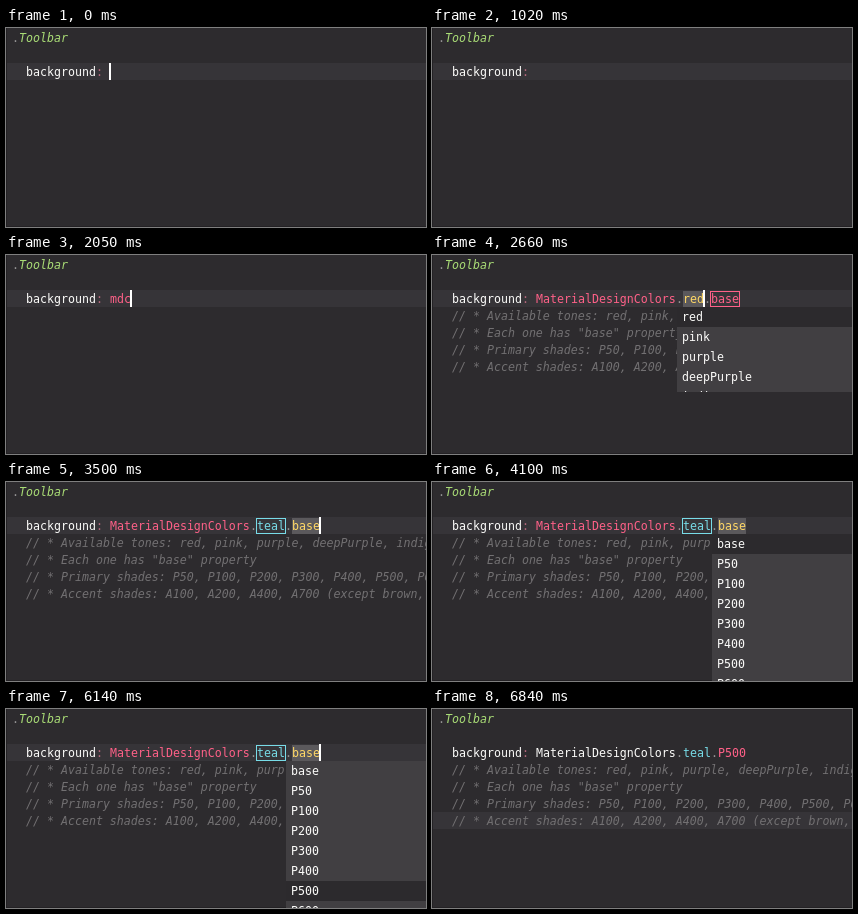
An HTML page with a canvas for the animation above (9460 ms loop, 420 px wide and 199 px high).

```html
<!DOCTYPE html>
<html lang="en">
<head>
<meta charset="utf-8">
<title>Color template completion</title>
<style>
html, body { margin: 0; width: 100%; height: 100%; overflow: hidden; background: #2d2b2e; }
canvas { display: block; width: 420px; height: 199px; }
</style>
</head>
<body>
<canvas id="stage"></canvas>
<script>
const W = 420, H = 199, LOOP = 9460;
const CELL = 7, LINE = 17, ROW = 20, LEFT = 20, CODE_Y = 35;
const FONT = '11.627px "DejaVu Sans Mono", "Noto Sans Mono", monospace';
const C = {
  bg: '#2d2b2e', line: '#363438', edge: '#232124', popup: '#413f42', picked: '#2c2a2d',
  text: '#fcfcfa', dim: '#939293', comment: '#727072', colon: '#b0667a',
  red: '#ff6188', green: '#a9dc76', yellow: '#ffd866', cyan: '#78dce8',
  select: '#5b595c', icon: '#b1823a', iconText: '#403016'
};

const PROPS = ['marquee-direction', 'mso-diagonal-down-color', 'mso-diagonal-down',
  'mso-data-placement', 'mso-default-height', 'mso-default-width',
  'mso-diagonal-down-source', 'mso-diagonal-down-style'];
const TONES = ['red', 'pink', 'purple', 'deepPurple', 'indigo', 'blue', 'lightBlue', 'cyan'];
const SHADES = ['base', 'P50', 'P100', 'P200', 'P300', 'P400', 'P500', 'P600'];
const COMMENTS = [
  '// * Available tones: red, pink, purple, deepPurple, indigo, blue, lightBlue',
  '// * Each one has "base" property',
  '// * Primary shades: P50, P100, P200, P300, P400, P500, P600, P700',
  '// * Accent shades: A100, A200, A400, A700 (except brown, grey)'
];

const canvas = document.getElementById('stage');
const dpr = window.devicePixelRatio || 1;
canvas.width = Math.round(W * dpr);
canvas.height = Math.round(H * dpr);
const ctx = canvas.getContext('2d');
ctx.scale(dpr, dpr);

// Number of moments already reached.
const passed = (t, times) => times.filter(m => t >= m).length;

function rect(x, y, w, h, color) {
  ctx.fillStyle = color;
  ctx.fillRect(x, y, w, h);
}

function write(s, x, y, color, style = '') {
  ctx.font = style + FONT;
  ctx.fillStyle = color;
  ctx.fillText(s, x, y);
  return x + s.length * CELL;
}

// Draws [text, color, look] runs; returns the x after the last one.
function writeRuns(runs, x, y) {
  for (const [s, color, look] of runs) {
    const w = s.length * CELL;
    if (look === 'selected') rect(x, y - 12, w, LINE - 1, C.select);
    if (look === 'boxed') {
      ctx.strokeStyle = color;
      ctx.lineWidth = 1;
      ctx.strokeRect(x - 0.5, y - 11.5, w + 1, LINE - 2);
    }
    x = write(s, x, y, color);
  }
  return x;
}

function caret(col) {
  rect(LEFT + col * CELL - 1, CODE_Y, 2, LINE, '#fff');
}

// Label with typed letters marked at word starts or right after another match.
function label(s, typed, x, y) {
  let n = 0, joined = true;
  for (let i = 0; i < s.length; i++) {
    const hit = n < typed.length && s[i] === typed[n] && (joined || s[i - 1] === '-');
    if (hit) n++;
    joined = hit;
    x = write(s[i], x, y, hit ? C.yellow : C.text);
  }
}

function icon(y) {
  ctx.fillStyle = C.icon;
  ctx.beginPath();
  ctx.roundRect(84, y + 3, 14, 14, 2.5);
  ctx.fill();
  ctx.font = '9px "DejaVu Sans", sans-serif';
  ctx.fillStyle = C.iconText;
  ctx.fillText('P', 88.4, y + 13.3);
}

function popup(x, items, { picked = 0, typed = '', icons = false, bottom = H } = {}) {
  const top = CODE_Y + LINE;
  const h = Math.min(bottom, top + items.length * ROW) - top;
  ctx.save();
  ctx.beginPath();
  ctx.rect(x, top, W - x, h);
  ctx.clip();
  rect(x, top, W - x, h, C.popup);
  items.forEach((item, i) => {
    const y = top + i * ROW;
    if (i === picked) rect(x, y, W - x, ROW, C.picked);
    if (icons) icon(y);
    label(item, typed, icons ? 103 : x + 5, y + 14);
  });
  ctx.restore();
}

function codeLine(runs) {
  return writeRuns([['background', C.text], [':', C.colon], [' ', C.text], ...runs], LEFT, CODE_Y + 13);
}

function typing(t) {
  const typed = 'mdc'.slice(0, passed(t, [1270, 1470, 1540]));
  codeLine([[typed, C.red]]);
  if (t >= 1400 && t < 2050) {
    if (t < 1610) popup(77, PROPS, { typed: typed.slice(0, 2), icons: true });
    else popup(77, ['mdc', PROPS[1]], { typed, icons: true });
  }
  if (t < 1020 || t >= 1270) caret(12 + typed.length);
}

function template(t) {
  COMMENTS.forEach((s, i) => write(s, LEFT, CODE_Y + 13 + (i + 1) * LINE, C.comment, 'italic '));
  const owner = [['MaterialDesignColors', t < 6840 ? C.red : C.text], ['.', C.dim]];
  const dot = ['.', C.dim];

  if (t < 3500) {
    const typed = 'te'.slice(0, passed(t, [2790, 2860]));
    const tone = typed ? [typed, C.cyan, 'boxed'] : ['red', C.yellow, 'selected'];
    codeLine([...owner, tone, dot, ['base', C.red, 'boxed']]);
    if (typed) popup(245, ['teal'], { typed });
    else if (t >= 2660) popup(245, TONES, { bottom: t < 2720 ? 137 : H });
    caret(33 + tone[0].length);
  } else if (t < 6510) {
    codeLine([...owner, ['teal', C.cyan, 'boxed'], dot, ['base', C.yellow, 'selected']]);
    if (t >= 3570) popup(280, SHADES, { picked: passed(t, [5340, 5500, 5640, 5830, 6000, 6140]) });
    if (passed(t, [4100, 4620, 5140, 5660, 6210]) % 2 === 0) caret(42);
  } else {
    const open = t < 6580;
    codeLine([...owner, ['teal', C.cyan, open ? 'boxed' : ''], dot, ['P500', C.red]]);
    if (open) caret(42);
  }
}

function draw(t) {
  rect(0, 0, W, H, C.bg);
  rect(0, t < 6580 ? CODE_Y : CODE_Y + 4 * LINE, W, LINE, C.line);
  rect(0, 0, 1, H, C.edge);
  rect(0, H - 1, W, 1, C.edge);
  writeRuns([['.', C.dim]], 6, 14);
  write('Toolbar', 13, 14, C.green, 'italic ');
  if (t < 2120) typing(t);
  else template(t);
}

const start = performance.now();
function tick() {
  draw((performance.now() - start) % LOOP);
  requestAnimationFrame(tick);
}
tick();
</script>
</body>
</html>
```
